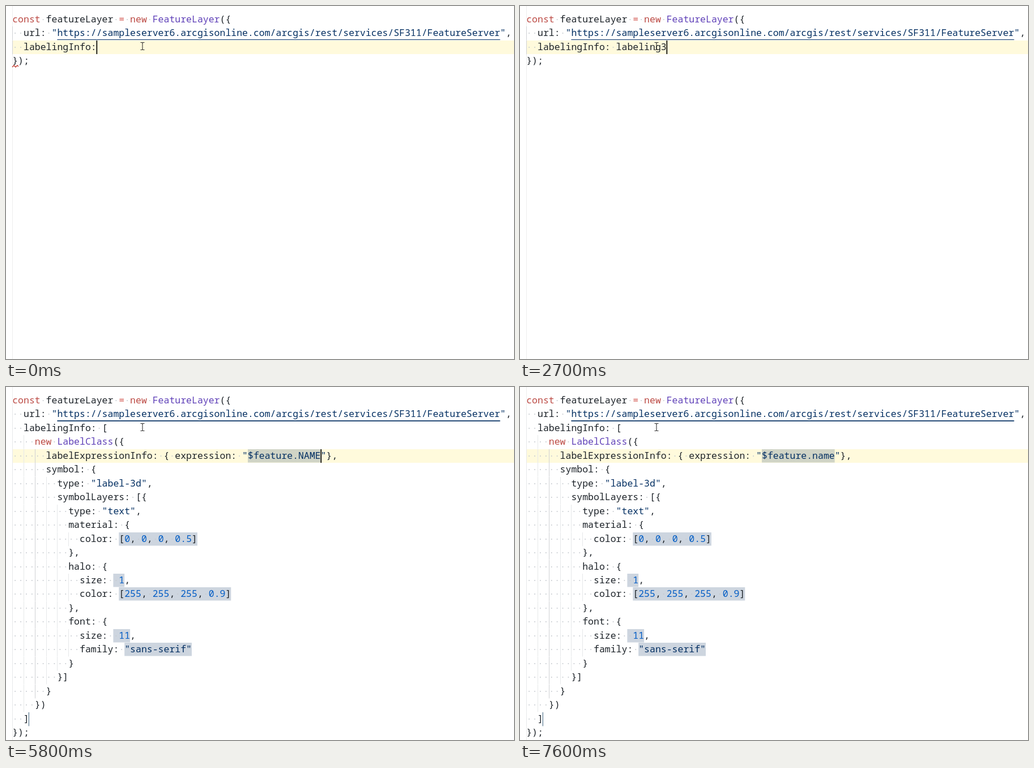
An HTML page for the animation above (8000 ms loop, 897 by 624 pixels).

```html
<!DOCTYPE html>
<html lang="en">
<head>
<meta charset="utf-8">
<style>
  html, body { margin: 0; width: 100%; height: 100%; overflow: hidden; background: #fff; }
  svg { display: block; }
  text { white-space: pre; }
  .code { font: 16.5px "Noto Sans Mono", monospace; fill: #1d2329; }
  .title { font: 700 25px "Open Sans", "Noto Sans", sans-serif; fill: #000; }
</style>
</head>
<body>
<svg id="stage" width="897" height="624" viewBox="0 0 897 624"></svg>
<script>
const LOOP = 8000;
const LEFT = 11.2, TOP = 12, CHAR = 9.9, ROW = 24.46;
const stage = document.getElementById("stage");
const URL_TEXT = "https://sampleserver6.arcgisonline.com/arcgis/rest/services/SF311/FeatureServer";
const HEAD = [
  "const featureLayer = new FeatureLayer({",
  `  url: "${URL_TEXT}",`
];

const colX = col => LEFT + col * CHAR;
const rowY = row => Math.round(TOP + row * ROW);
const rect = (x, y, w, h, fill, extra = "") =>
  `<rect x="${x}" y="${y}" width="${w}" height="${h}" fill="${fill}" ${extra}/>`;
const text = (x, y, body, extra = 'class="code"') => `<text x="${x}" y="${y}" ${extra}>${body}</text>`;
const span = (body, fill) => `<tspan fill="${fill}">${body}</tspan>`;
const caret = (row, col) => rect(Math.round(colX(col)) - 0.5, rowY(row), 1.7, 24, "#000");
const activeLine = row => rect(12, rowY(row), 885, 24, "#fffadc");

const TOKEN = /("[^"]*")|\b(const|new)\b|( = )|\b(FeatureLayer|LabelClass)\b|\b(\d[\d.]*)/g;
const COLORS = ["#032f62", "#bc4a44", "#cf4a42", "#5f40b8", "#005cc5"];
const colorize = line => line.replace(TOKEN, (word, ...groups) =>
  span(word, COLORS[groups.findIndex(Boolean)]));

function snippet(field) {
  return `  labelingInfo: [
    new LabelClass({
      labelExpressionInfo: { expression: "$feature.${field}"},
      symbol: {
        type: "label-3d",
        symbolLayers: [{
          type: "text",
          material: {
            color: [0, 0, 0, 0.5]
          },
          halo: {
            size:  1,
            color: [255, 255, 255, 0.9]
          },
          font: {
            size:  11,
            family: "sans-serif"
          }
        }]
      }
    })
  ]
});`.split("\n");
}

function guides(lines, active) {
  let out = rect(11, 0, 1, 624, "#eeeeee");
  lines.forEach((line, row) => {
    const indent = line.search(/\S/);
    for (let col = 0; col < indent; col += 2) {
      out += rect(Math.round(colX(col)), rowY(row), 1, ROW, col === active ? "#cfd1d4" : "#e6e8ea");
    }
  });
  return out;
}

function spaceDots(line, row) {
  return [...line].map((char, col) => char === " "
    ? `<circle cx="${colX(col + 0.5)}" cy="${rowY(row) + 12}" r="1" fill="#c6cacf"/>` : "").join("");
}

function codeLines(lines, isColored) {
  return lines.map((line, row) => spaceDots(line, row) +
    text(LEFT, rowY(row) + 17, isColored(row) ? colorize(line) : line)).join("");
}

const underline = thickness => rect(colX(8), 59, URL_TEXT.length * CHAR, thickness, "#032f62");

function placeholders(lines, fieldColor) {
  return lines.map((line, row) => {
    const found = line.match(/\[\d.*\]| \d+(?=,$)|"sans-serif"|\$feature\.\w*/);
    if (!found) return "";
    const fill = found[0][0] === "$" ? fieldColor : "#cdd5df";
    return rect(colX(found.index), rowY(row), found[0].length * CHAR, 23.5, fill);
  }).join("");
}

const squiggle = '<path d="M11 108l3-3 3 3 3-3 2 2" fill="none" stroke="#c0392f" stroke-width="1.4"/>';
const pointer = '<path d="M237.5 64.5h2.5l1 1 1-1h2.5M241 65.5v11M237.5 77.5h2.5l1-1 1 1h2.5" fill="none" stroke="#333" stroke-width="1.1"/>';

function suggestion() {
  return rect(258.5, 85.5, 552, 24, "#d6e9fb", 'stroke="#c3c9d0"') +
    '<path d="M268.5 106V91.5h15V106" fill="#eef3f8" stroke="#423438" stroke-width="1.6"/>' +
    '<path d="M268 107h17" stroke="#423438" stroke-width="1.8" stroke-dasharray="1.8 1.8"/>' +
    text(290, 104.5, `<tspan fill="#0067c0" font-weight="700">labeling3</tspan>d`) +
    text(406, 104.5, span("Generate 3D labelingInfo for a layer…", "#6b747d")) +
    '<circle cx="785.5" cy="99" r="6.8" fill="#439fe0"/>' +
    rect(784.6, 94.5, 1.9, 2, "#fff") + rect(784.6, 97.7, 1.9, 5.4, "#fff");
}

function typingScene(time) {
  const step = Math.floor(time / 300);
  const typed = " labeling3".slice(0, step ? step + 1 : 0);
  const lines = [...HEAD, "  labelingInfo:" + typed, "});"];
  return activeLine(2) + guides(lines, 0) + codeLines(lines, () => true) + underline(1) +
    (time < 1500 ? squiggle : "") + caret(2, lines[2].length) + pointer +
    (time >= 3000 ? suggestion() : "") +
    (time >= 3300 ? text(449, 326, "Press Tab", 'class="title" text-anchor="middle"') : "");
}

function snippetScene(time) {
  const editing = time >= 5800;
  const step = Math.max(0, Math.floor((time - 5800) / 200));
  const field = step < 5 ? "NAME".slice(0, 4 - step) : "name".slice(0, step - 4);
  const lines = [...HEAD, ...snippet(field)];
  return (editing ? activeLine(4) : "") + guides(lines, 4) +
    placeholders(lines, editing ? "#d0d4c6" : "#89b0dc") +
    codeLines(lines, row => editing || row < 2) + underline(1.7) +
    rect(39.8, rowY(23), 1.2, ROW, "#587890") +
    (step < 9 ? caret(4, 51 + field.length) : "") + pointer;
}

let shown = -1;
function draw(now) {
  const time = now % LOOP;
  const tick = Math.floor(time / 100);
  if (tick !== shown) {
    shown = tick;
    stage.innerHTML = time < 5300 ? typingScene(time) : snippetScene(time);
  }
}

const start = performance.now();
function frame() {
  draw(performance.now() - start);
  requestAnimationFrame(frame);
}
frame();
</script>
</body>
</html>
```
